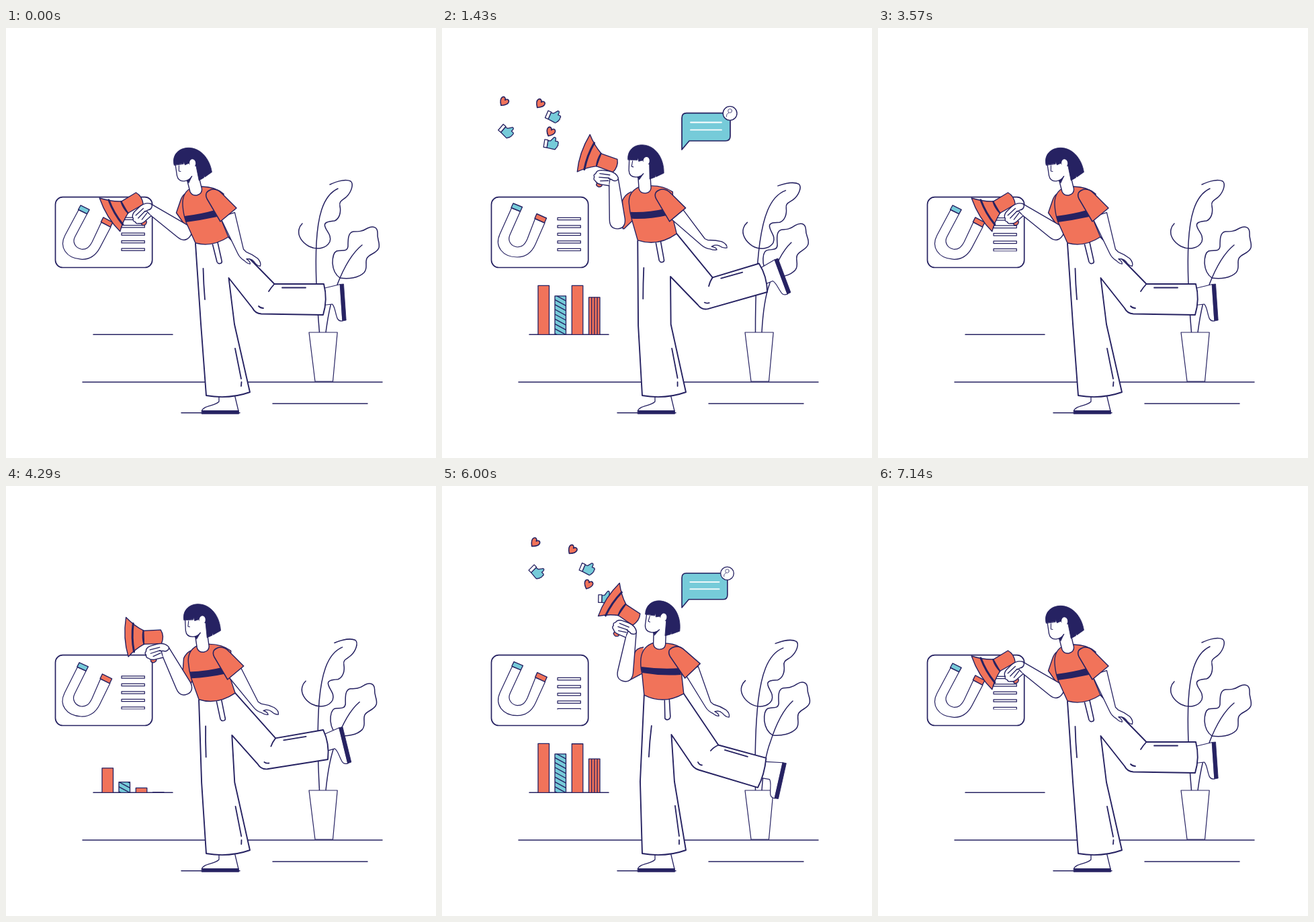
Animation, 640 px wide and 640 px high, one loop 7210 ms. Source, as an HTML page with a canvas:

```html
<!DOCTYPE html>
<html lang="en">
<head>
<meta charset="utf-8">
<title>Megaphone</title>
<style>
html, body { margin: 0; width: 100%; height: 100%; overflow: hidden; background: #fff; }
canvas { display: block; width: 100vw; height: 100vh; }
</style>
</head>
<body>
<canvas id="stage" width="640" height="640"></canvas>
<script>
const ctx = document.getElementById('stage').getContext('2d');
const NAVY = '#262262', CORAL = '#f1735a', TEAL = '#76cbd9', WHITE = '#fff';
const LOOP = 7210, STEP = 71.4, CYCLE = 50;

const clamp = (v, a = 0, b = 1) => Math.min(b, Math.max(a, v));
const ease = u => 0.5 - 0.5 * Math.cos(Math.PI * clamp(u));
const rad = d => d * Math.PI / 180;

function draw(d, fill, line = 1.4) {
  const p = typeof d === 'string' ? new Path2D(d) : d;
  if (fill) { ctx.fillStyle = fill; ctx.fill(p); }
  if (line) { ctx.strokeStyle = NAVY; ctx.lineWidth = line; ctx.stroke(p); }
}

function group(fn) { ctx.save(); fn(); ctx.restore(); }

function turn(x, y, deg) {
  ctx.translate(x, y);
  ctx.rotate(rad(deg));
  ctx.translate(-x, -y);
}

// Body poses: leaning in, calling, leaning back.
let weight = [1, 0, 0];

function setPose(f) {
  const keys = [[0, 0], [18.5, 1], [33, 2], [50, 0]];
  let i = 0;
  while (i < 2 && f >= keys[i + 1][0]) i++;
  const [t0, from] = keys[i], [t1, to] = keys[i + 1];
  const s = ease((f - t0) / (t1 - t0));
  weight = [0, 0, 0];
  weight[from] += 1 - s;
  weight[to] += s;
}

const mix = v => v[0] * weight[0] + v[1] * weight[1] + v[2] * weight[2];
const NUM = /-?\d+(\.\d+)?/g;

// Blends three paths that share the same commands.
function morph(a, b, c) {
  const sets = [a, b, c].map(s => s.match(NUM).map(Number));
  return () => {
    let i = 0;
    return a.replace(NUM, () => {
      const v = mix(sets.map(s => s[i]));
      i++;
      return v.toFixed(2);
    });
  };
}

// Rigid part drawn in its calling-pose coordinates.
function limb(x, y, deg, fn) {
  group(() => {
    ctx.translate(mix(x), mix(y));
    ctx.rotate(rad(mix(deg)));
    ctx.translate(-x[1], -y[1]);
    fn();
  });
}

const pants = morph(
  'M282 321L290 440L298 547Q332 553 363 542L340 441L331.5 372L367 417Q371 425 380 425.5L472 427Q479 404 473 381L399.5 381L331 311',
  'M291 317L292 443L298 547Q332 553 363 542L340.5 441L340 370L381 412Q387 420 396 418L484.5 391.5Q484 368 471.5 349L402.5 371L349 306',
  'M301 311L295 440L298 547Q332 553 363 542L346 440L341.5 370L370 412Q374 420 382 422.5L470 449Q480 430 482.5 405L411.5 385.5L360 309');
const creases = morph(
  'M399.5 381Q394 387 391 392M411 386.5L446 386.5M376 414Q379 417 383 417M293.5 358Q294 381 296 404M341 477L350 522M350.5 527L350 533',
  'M402.5 371Q399 376 397 384M415 372L447 362.5M391 408.5Q394 410 398 409M300 357Q299 380 299 403M342 477L350.5 521M350.5 527L350.5 533',
  'M411.5 385.5Q404 389 400 394M421 393L455 403M381 411Q383 415 387 415.5M312 357Q309 380 308 403M347 476L353 521M353 527L353 533');
const strap = morph(
  'M307.5 322L314 348Q316 352 320 350Q322 349 321 346L315 319',
  'M318 320L323 346Q325 350 329 348Q331 347 330 344L325 317',
  'M331.5 319L332 346Q334 349 338 347Q340 346 340 343L338.5 317');
const farSleeve = morph(
  'M266 247Q262 250 260 256L253.5 275L275 306L270 285',
  'M281 244Q272 248 268 257L269 299L271 299L285 285',
  'M300 240Q290 241 287 248L276 288L277 290L298 279');
const shirt = morph(
  'M274 239Q262 246 263 264Q264 278 268 289L282 320Q306 327 331 311L321 287L324 247Q311 236 291 236Z',
  'M292 237Q276 245 278 262Q279 274 282 285L291 316Q321 326 349 306L344 286L343 244Q328 234 308 235Z',
  'M313 234Q296 241 296 262Q296 272 298 279L301 311Q330 326 360 309L357 281L355 240Q345 234 330 234Z');
const band = morph(
  'M265.5 280Q290 277 311 271L314 281Q291 286 268 289Z',
  'M280 274Q306 275 331 269L334 279Q308 285 282 284Z',
  'M296.5 269Q326 273 355 271L356 281Q327 283 298 278Z');

function ground() {
  draw('M114 527H560M397 559H538M130 456.3H248M261 572.8H348', null, 1.5);
}

function magnet(sway) {
  const k = 1 - sway / 0.905;
  group(() => {
    ctx.translate(2.3 * k, 3.3 * k);
    turn(112, 300, 4 * k);
    draw('M103.5 268L86 307C78 325 90 341 112 341C126 341 134 333 139 322L153 290L138.5 284L127 314C123 323 119 326 112 326C103 325 97 317 101 308L116.5 273Z', WHITE, 1.2);
    draw('M106 261L119.500 266.500L116.500 273L103 267.500Z', TEAL);
    draw('M141 276.500L155.500 283L152.500 290L138 283.500Z', CORAL);
  });
}

function panel(n, sway) {
  const box = new Path2D();
  box.roundRect(73.5, 251.7, 144.2, 104.8, 11);
  draw(box, WHITE, 1.7);
  magnet(sway);
  const gap = 11.5, shift = (((-2.287 * n + 0.2) % gap) + gap) % gap;
  group(() => {
    ctx.beginPath();
    ctx.rect(170, 280.7, 40, 51.8);
    ctx.clip();
    for (let i = -1; i < 6; i++) {
      draw(`M172 ${281.8 + shift + i * gap}h34.300v3.400h-34.300z`, null, 1.25);
    }
  });
}

function bars(f) {
  const heights = [73, 57.5, 73, 55.5], lefts = [143, 168, 193.3, 218.5];
  heights.forEach((full, i) => {
    const grow = ease((f - 6 - i * 1.2) / 8);
    const shrink = ease((f - 36 + i * 1.2) / 8);
    const h = full * grow * (1 - shrink), x = lefts[i];
    if (h < 0.3) return;
    const bar = new Path2D();
    bar.rect(x, 456.3 - h, 16.5, h);
    draw(bar, i === 1 ? TEAL : CORAL, 0);
    group(() => {
      ctx.clip(bar);
      if (i === 1) {
        for (let y = 390; y < 460; y += 7.2) draw(`M${x} ${y}l16.500 9`, null, 1.4);
      }
      if (i === 3) draw(`M${x + 4.2} 390v70m4.200 0v-70m4.200 0v70`, null, 1.3);
    });
    draw(bar, null, 1.3);
  });
}

function plant(sway) {
  group(() => {
    turn(468, 453, 5.2 * sway);
    draw('M466.5 453C462 400 460 360 462 320C464 285 470 250 494 239', null, 1.5);
    draw('M482 233C495 227 507 225 513 228C518 232 514 244 507 251C502 256 495 257 497 265C499 275 496 284 489 287C480 288 472 289 475 296C477 303 485 308 482 318C477 328 463 331 451 325C440 319 434 309 436 300C437 295 439 293 441 291', null, 1.5);
  });
  group(() => {
    turn(476, 453, -4.85 * sway);
    draw('M497 372Q487 365 486 350Q486 335 492 332C500 330 508 334 509 325C509 315 509 304 517 303C525 303 530 303 538 298C546 294 553 296 553 305C552 315 557 319 555 327C552 336 540 336 537 343C534 350 539 357 533 364C525 372 510 374 497 372', null, 1.5);
    draw('M476 453C479 430 483 404 493 382C503 356 515 335 530 323', null, 1.5);
  });
  draw('M451 453H493.200L486.500 526H460Z', WHITE, 1.2);
}

function bubbleScale(f) {
  if (f < 20) return ease((f - 10) / 10);
  if (f < 36) return 1 - 0.15 * Math.sin(Math.PI * (f - 20) / 16);
  return 1 - ease((f - 36) / 10);
}

function bubble(f) {
  const s = bubbleScale(f);
  if (s < 0.01) return;
  group(() => {
    ctx.translate(357, 181);
    ctx.scale(s, s);
    ctx.translate(-357, -181);
    draw('M357 181V134Q357 126.700 364 126.700H422Q429 126.700 429 134V161Q429 168 422 168H368Z', TEAL, 1.7);
    ctx.strokeStyle = WHITE;
    ctx.lineWidth = 1.8;
    ctx.stroke(new Path2D('M370 140.500H416M370 151.700H416'));
    const badge = new Path2D(), face = new Path2D();
    badge.arc(428.6, 127, 10.4, 0, 7);
    face.arc(428.6, 123.3, 2.9, 0, 7);
    draw(badge, WHITE, 1.4);
    draw(face, null, 0.8);
    draw('M423.500 132Q423 127.500 426.500 126.500', null, 0.8);
  });
}

function heart() {
  draw('M0 7C-5.500 2.500 -7 -1 -6 -4C-4.500 -7 -1 -6.500 0 -3C1 -6.500 4.500 -7 6 -4C7 -1 5.500 2.500 0 7Z', CORAL, 1.6);
}

function thumb() {
  draw('M-5 -4L-1 -4.500L3.500 -10.500Q7 -11.500 6 -5L9.500 -5Q11.500 -4 10.500 -1.500Q11.500 0.500 10 2Q10 4.500 8.500 5Q8 7.500 6 7.500L-5 6.500Z', TEAL, 1.3);
  draw('M-10 -5H-5V6.500H-10Z', WHITE, 1.3);
}

// shape, angle, launch frame, first resting place, second resting place
const ICONS = [
  [heart, 38, 29.2, [85, 105], [120, 70]],
  [heart, 38, 30.5, [139, 105], [177, 71]],
  [thumb, 42, 29.7, [87, 151], [118, 119]],
  [thumb, 28, 32.3, [154, 118], [186, 77]],
  [heart, 34, 33, [144, 143], [162, 103]],
  [thumb, 18, 33.95, [132, 163], [137, 120]]
];

function burst(f, mouth, lag, slot, end, tilt, drift) {
  const gone = 1 - clamp((f - end) / 2.5);
  if (gone <= 0) return;
  for (const icon of ICONS) {
    const age = f - icon[2] + lag;
    if (age <= 0) continue;
    const left = Math.exp(-age / 2.5), rest = icon[slot];
    group(() => {
      ctx.translate(rest[0] + (mouth[0] - rest[0]) * left,
        rest[1] + (mouth[1] - rest[1]) * left + drift);
      ctx.rotate(rad(icon[1] + tilt - 24 * left));
      ctx.scale(gone, gone);
      icon[0]();
    });
  }
}

function icons(f) {
  burst(f, [212, 188], 16.4, 3, 26, 0, -1.6 * Math.max(0, f - 21));
  burst(f, [245, 168], 0, 4, 44.5, 7, 0);
}

function standingFoot() {
  draw('M317 548V556C311 563 293 562 291.500 570H346L340 545', WHITE, 1.3);
  draw('M291.500 569.800H346.500V574.300H291.500Z', NAVY, 0.8);
}

function raisedFoot() {
  limb([497.5, 495, 507.5], [381.5, 343, 412], [17.5, 0, 34.2], () => {
    ctx.translate(495, 343);
    ctx.rotate(rad(-17.5));
    draw('M-25 6L0 0L3.500 54.500C-1 55 -4 53 -5 49C-8 40 -8 33 -12 29.500L-25 31', WHITE, 1.2);
    draw('M0 0L5 -0.500L8.700 53.500L3.700 54.300Z', NAVY, 0.8);
  });
}

function callingArm() {
  limb([214.5, 254, 281.5], [270.5, 228, 219.6], [-50, 0, 15], () => {
    draw('M231 226L229 234Q232 239 237 235.500L241 224Z', CORAL);
    draw('M235 187L260 195.500Q262 206 253.500 215L229 206Z', CORAL);
    draw('M219 159Q226 176 236 187L229 206Q214 208 200.500 214.500Q203 186 219 159Z', CORAL);
    draw('M225.500 171.500Q215 190 211 211', null, 3);
    draw('M235.500 187Q230 196 229 206', null, 2);
    draw('M248 233L249 285C249 296 254 299 261 299C269 299 273 293 272 284L261.500 224L250 220Z', WHITE);
    draw('M248 235L238 233.500C232 233 229 231 227.500 228Q224 226 226 222Q224 219 228 217Q229 212.500 236 212L247 213C253 214 259 217 261.500 223C262 228 255 229 252 226L247 224', WHITE);
    draw('M234 217L249 219M233 222.500L248 223.500M235 228L247 227.500', null, 1.3);
  });
}

function head() {
  limb([283, 301, 323], [246, 243, 240], [-10, 0, 6], () => {
    draw('M291 219L292.500 239Q294 246 302 246Q310 245 310.500 238L309.500 222', WHITE);
    draw('M278 195L277.500 212Q278 222 288 222Q296 222 300 216L310 222V195Z', WHITE, 0);
    draw('M278 195L277.500 212Q278 222 288 222Q295 222 299 217', null, 1.3);
    draw('M290.500 222Q296 221 299.500 216.500L293 226Z', NAVY, 0.5);
    draw('M276 196C275 182 285 173.500 298 174C318 175 330 195 329.500 216L318 221.500L317 218L316.500 222L308.500 225L308 203L299 199L298 197L292 198.500L291 193L290 196.500Z', NAVY, 0.8);
    const ear = new Path2D();
    ear.ellipse(303.5, 198, 4.6, 6, 0.1, 0, 7);
    draw(ear, WHITE, 0);
    draw('M283 198L281.500 206L284 207', null, 1.1);
  });
}

function nearArm() {
  limb([330, 350, 372], [281, 279, 276], [24, 0, 18], () => {
    draw('M340 284L386 323Q392 328 399 328.500Q405 331 409 329.500Q408 326 401 325L405 323Q409 322 413 324Q419 328 424 326.500Q424 321 416 317.500Q406 315 396 315.500L391 313.500L357 269Z', WHITE, 1.3);
  });
  limb([319, 338, 362], [288, 288, 286], [0, 0, -4], () => {
    draw('M338 288L318 254Q314 245 322 241.500Q332 237 341 247L362 268Z', CORAL, 1.5);
  });
}

function figure() {
  raisedFoot();
  standingFoot();
  draw(pants(), WHITE, 1.9);
  draw(creases(), null, 1.8);
  draw(strap(), WHITE, 1.6);
  draw(farSleeve(), CORAL);
  callingArm();
  const body = shirt();
  draw(body, CORAL);
  group(() => {
    ctx.clip(new Path2D(body));
    draw(band(), NAVY, 0);
  });
  head();
  nearArm();
}

function render(now) {
  const n = Math.min(100, Math.floor((now % LOOP) / STEP + 0.05));
  const f = n % CYCLE;
  const sway = 0.5 - 0.5 * Math.cos(2 * Math.PI * f / CYCLE);
  setPose(f);
  ctx.fillStyle = WHITE;
  ctx.fillRect(0, 0, 640, 640);
  ctx.lineJoin = 'round';
  ctx.lineCap = 'round';
  ground();
  panel(n, sway);
  bars(f);
  plant(sway);
  bubble(f);
  icons(f);
  figure();
}

const begin = performance.now();
function tick() {
  render(performance.now() - begin);
  requestAnimationFrame(tick);
}
tick();
</script>
</body>
</html>
```
